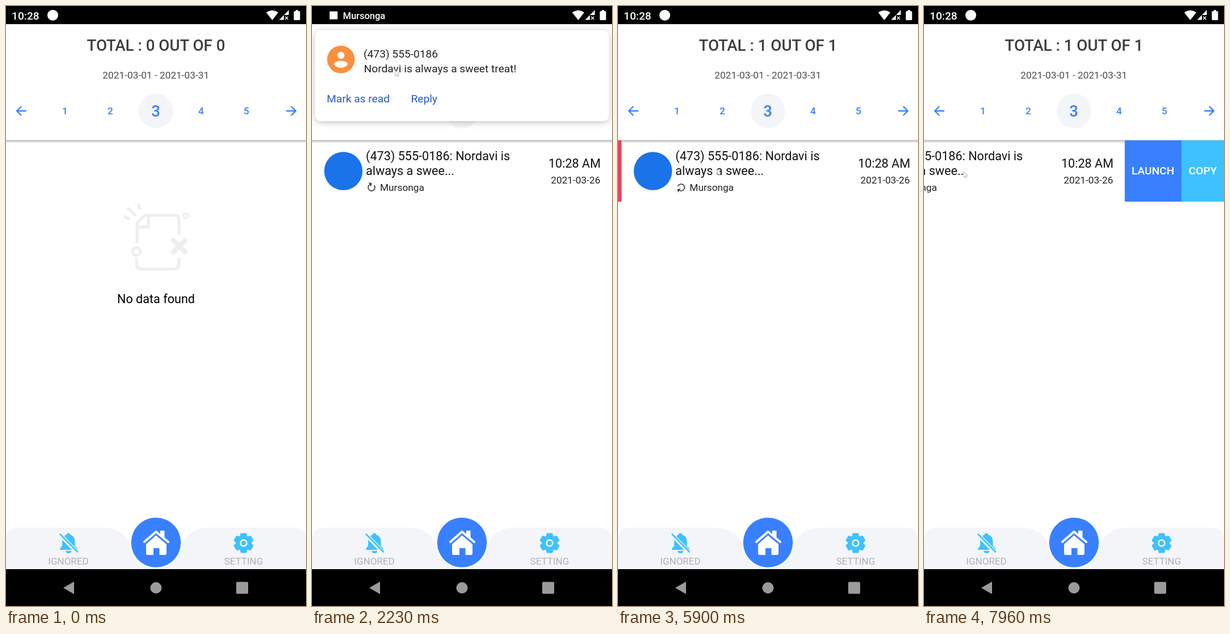
These frames come from a looping animation (529x1058 px, 8000 ms). An HTML page:

```html
<!DOCTYPE html>
<html lang="en">
<head>
<meta charset="utf-8">
<title>Notification list</title>
<style>
  html, body { margin: 0; width: 100%; height: 100%; overflow: hidden; background: #fff; }
  svg { display: block; width: 529px; height: 1058px; font-family: Roboto, sans-serif; }
  .mid { text-anchor: middle; }
  .end { text-anchor: end; }
  .bold { font-weight: 500; }
  .s { font-size: 17.3px; }
  .m { font-size: 21.6px; }
  .l { font-size: 27.7px; }
  .btn { font-size: 19.2px; font-weight: 500; fill: #fff; }
  .note { font-size: 19.2px; fill: #222; }
  .line { fill: none; stroke-linecap: round; stroke-linejoin: round; }
</style>
</head>
<body>
<svg viewBox="0 0 529 1058">
  <defs>
    <linearGradient id="edge" x2="0" y2="1">
      <stop stop-color="#e4e4e4"/><stop offset=".25" stop-color="#c2c2c2"/>
      <stop offset=".5" stop-color="#dadada"/><stop offset="1" stop-color="#fff"/>
    </linearGradient>
    <linearGradient id="busy" x2="0" y2="1">
      <stop stop-color="#dde2ee"/><stop offset=".3" stop-color="#b3c1e2"/>
      <stop offset=".7" stop-color="#c9d8f8"/><stop offset="1" stop-color="#f4f7ff"/>
    </linearGradient>
    <filter id="shadow" x="-20%" y="-20%" width="140%" height="140%">
      <feDropShadow dx="0" dy="2" stdDeviation="6" flood-opacity=".25"/>
    </filter>
    <clipPath id="cardClip"><rect y="43" width="523.5" height="160"/></clipPath>
    <clipPath id="leftClip"><rect id="leftRect" y="237" height="108"/></clipPath>
    <clipPath id="rightClip"><rect id="rightRect" y="237" height="108"/></clipPath>
  </defs>
  <rect width="529" height="1058" fill="#fff"/>

  <!-- header -->
  <rect id="divider" y="236" width="529" height="6"/>
  <text id="total" class="l bold mid" x="264.5" y="79" fill="#3d3d3d"></text>
  <text class="s mid" x="264.3" y="128" fill="#4c4c4c">2021-03-01 - 2021-03-31</text>
  <circle cx="264.5" cy="185" r="30.5" fill="#f4f5f8"/>
  <g id="pages" class="bold mid" fill="#3880ff"></g>
  <path class="line" d="M35 185H19M26.500 177.500L19 185L26.500 192.500M495 185H511M503.500 177.500L511 185L503.500 192.500"
    stroke="#3880ff" stroke-width="2.3"/>

  <!-- empty state -->
  <g id="empty">
    <g class="line" stroke="#eee" stroke-width="5">
      <path d="M231 415V383L245 369H298Q305 369 305 376V401M251 370V390H232M230 447V454Q230 464 240 464H294Q305 464 305 454V446"/>
      <path d="M209.500 372L217 375M215.500 357L227 368M233.500 350L236 357"/>
      <circle cx="230" cy="433" r="7"/>
      <circle cx="316.500" cy="370" r="4" stroke-width="3.2"/>
      <path d="M295 413L316 434M316 413L295 434" stroke-width="8.500"/>
    </g>
    <text class="m mid" x="264.500" y="524">No data found</text>
  </g>

  <!-- list row -->
  <g id="list">
    <g id="row">
      <circle cx="55.300" cy="291" r="33.800" fill="#1a73e8"/>
      <g class="m" fill="#111">
        <text x="95" y="272">(473) 555-0186: Nordavi is</text>
        <text x="95" y="297.500">always a swee...</text>
        <text class="end" x="509" y="285">10:28 AM</text>
      </g>
      <g class="s" fill="#222">
        <text x="120" y="325.700">Mursonga</text>
        <text class="end" x="508.500" y="313">2021-03-26</text>
      </g>
      <g id="spin" class="line" stroke="#222" stroke-width="1.500">
        <path d="M4.800 3.600A6 6 0 1 1 3.600 -4.800L5.500 -3.200M6.200 -6.500V-2.500H2.200"/>
      </g>
    </g>
    <g clip-path="url(#leftClip)">
      <rect y="237" width="186" height="108" fill="#eb445a"/>
      <text class="btn" x="12" y="297">DELETE</text>
      <text class="btn" x="105" y="297">IGNORE</text>
    </g>
    <g clip-path="url(#rightClip)">
      <rect x="354" y="237" width="100" height="108" fill="#3880ff"/>
      <rect x="454" y="237" width="75" height="108" fill="#3dc2ff"/>
      <text class="btn mid" x="403.700" y="297">LAUNCH</text>
      <text class="btn mid" x="491.500" y="297">COPY</text>
    </g>
  </g>

  <!-- tab bar -->
  <path d="M0 993V942Q0 920 22 920H172C196 920 210 932 217 945A47.500 47.500 0 0 0 312 945C319 932 333 920 357 920H507Q529 920 529 942V993Z" fill="#f4f5f8"/>
  <circle cx="264.500" cy="946" r="43.800" fill="#3880ff"/>
  <g fill="#fff">
    <path class="line" d="M244 945L264.500 927L286 945" style="stroke:#fff;stroke-width:4"/>
    <path d="M272 925H279.500V940L272 933ZM247 949L264.500 933.500L283 949V965Q283 968 280 968H270.500V956H260V968H250Q247 968 247 965Z"/>
  </g>
  <g fill="#3dc2ff">
    <path d="M110 929.500C112 929.500 113.500 931 113.500 932.500C119 934 121.500 938.500 121.500 945V952L126 957V959H95V957L99 952V945C99 938.500 101.500 934 106.500 932.500C106.500 931 108 929.500 110 929.500ZM105 961H115.500A5.300 4.500 0 0 1 105 961Z"/>
    <path class="line" d="M96 933L125 963" stroke="#f4f5f8" stroke-width="7"/>
    <path class="line" d="M95.500 931.500L126 962.500" stroke="#3dc2ff" stroke-width="2.600"/>
    <path id="gear" stroke="#3dc2ff" stroke-width="3" stroke-linejoin="round"/>
    <circle cx="419" cy="947" r="5.400" stroke="#f4f5f8" stroke-width="2.600"/>
  </g>
  <g class="mid" font-size="17" fill="#afb0b5">
    <text x="110" y="984.700">IGNORED</text>
    <text x="419" y="984.700">SETTING</text>
  </g>

  <!-- system navigation -->
  <rect y="993" width="529" height="65"/>
  <g fill="#9b9b9b">
    <path d="M101 1026L120 1015V1037Z"/>
    <circle cx="264.500" cy="1026" r="10"/>
    <rect x="406" y="1015.500" width="21" height="21" rx="2"/>
  </g>

  <!-- heads-up card -->
  <g id="card">
    <rect id="sheet" y="43" height="160" rx="10" fill="#fff" filter="url(#shadow)"/>
    <g clip-path="url(#cardClip)">
      <g id="content" class="note">
        <circle cx="51" cy="94.300" r="24.300" fill="#fa903e"/>
        <circle cx="51" cy="87" r="6.200" fill="#fff"/>
        <path d="M39 103C39 94.500 63 94.500 63 103C60 107 56 109 51 109S42 107 39 103Z" fill="#fff"/>
        <text x="91" y="91">(473) 555-0186</text>
        <text x="91.500" y="117.300">Nordavi is always a sweet treat!</text>
        <g fill="#2857c8">
          <text x="26" y="170">Mark as read</text>
          <text x="174.500" y="170">Reply</text>
        </g>
      </g>
    </g>
  </g>

  <!-- status bar -->
  <rect width="529" height="32"/>
  <g fill="#fff">
    <g id="clock">
      <text class="bold" x="10" y="23.800" font-size="19.200">10:28</text>
      <circle cx="82.500" cy="16.300" r="9.500"/>
    </g>
    <g id="ticker">
      <rect x="31" y="9.500" width="14" height="14"/>
      <text class="bold" x="54.500" y="22.800" font-size="16.500">Mursonga</text>
    </g>
    <path d="M459 11.500Q469.500 4 480 11.500L469.500 25Z"/>
    <path d="M498 8V16H490V24.500H481.500Z"/>
    <path class="line" d="M498 8V15M492.500 19L497 23.500M497 19L492.500 23.500" stroke="#fff" stroke-width="1.400"/>
    <path d="M511 7H515V9H517Q518.500 9 518.500 10.500V23.500Q518.500 25 517 25H509Q507.500 25 507.500 23.500V10.500Q507.500 9 509 9H511Z"/>
  </g>

  <path id="cursor" d="M0 0V10L2.300 8L3.800 11.500L5.500 10.800L4.100 7.500H7Z" fill="#fff" stroke="#a4a4a4" stroke-width=".8"/>
</svg>

<script>
const LOOP = 8000, START = 500, STEP = 1000 / 15;
const $ = id => document.getElementById(id);

// Tables of [time, value...]
const drop = [[433, -175], [700, -25], [1033, 0]];
const swipe = [[2300, 0], [2966, 299], [3230, 520]];
const slide = [[5880, 0], [6433, 174], [6560, 186], [6850, 186], [7180, 0], [7420, 0], [7920, -175]];
const pointer = [
  [1500, 215, 400], [2100, 156, 124], [2300, 142, 108], [2966, 441, 105],
  [3200, 505, 112], [3833, 322, 640], [4300, 321, 754], [4800, 321, 754],
  [5560, 172, 368], [5820, 150, 288], [6433, 341, 286], [6560, 352, 286],
  [6850, 352, 286], [7180, 261, 290], [7400, 261, 290], [7920, 70, 292]
];

function at(table, t) {
  if (t <= table[0][0]) return table[0].slice(1);
  const i = table.findIndex(row => row[0] > t);
  if (i < 0) return table[table.length - 1].slice(1);
  const a = table[i - 1], b = table[i];
  const p = (t - a[0]) / (b[0] - a[0]);
  return a.slice(1).map((v, k) => v + (b[k + 1] - v) * p);
}

const set = (id, name, value) => $(id).setAttribute(name, value);
const show = (id, on) => set(id, 'display', on ? 'inline' : 'none');
const move = (id, x, y) => set(id, 'transform', `translate(${x} ${y})`);

function buildPages() {
  for (let n = 1; n <= 5; n++) {
    const text = document.createElementNS('http://www.w3.org/2000/svg', 'text');
    const big = n === 3;
    text.setAttribute('x', 264 + (n - 3) * 80);
    text.setAttribute('y', big ? 194.500 : 190.800);
    text.setAttribute('class', big ? 'l' : 's');
    text.textContent = n;
    $('pages').append(text);
  }
}

function buildGear() {
  const points = [];
  for (let tooth = 0; tooth < 6; tooth++) {
    for (const [deg, r] of [[-23, 12.5], [-14, 16.5], [14, 16.5], [23, 12.5]]) {
      const a = (tooth * 60 + 30 + deg) * Math.PI / 180;
      points.push(`${419 + r * Math.cos(a)} ${947 + r * Math.sin(a)}`);
    }
  }
  set('gear', 'd', `M${points.join('L')}Z`);
}

function render(time) {
  const k = Math.floor((time - START + 10) / STEP);
  const t = k < 0 ? 0 : START + k * STEP;
  const loaded = t >= 1500, loading = t >= 1299 && !loaded;

  show('empty', t < 1299);
  show('list', loaded);
  set('divider', 'fill', loading ? 'url(#busy)' : 'url(#edge)');
  const n = t < 1299 ? 0 : 1;
  $('total').textContent = `TOTAL : ${n} OUT OF ${n}`;

  const ticker = t >= START && t < 3360;
  show('ticker', ticker);
  show('clock', !ticker);

  const [dy] = at(drop, t), [dx] = at(swipe, t);
  show('card', t >= START && dx < 510);
  move('card', 0, dy);
  move('content', dx, 0);
  set('sheet', 'x', 5.5 + dx);
  set('sheet', 'width', Math.max(0, 518 - dx));

  const [off] = at(slide, t);
  move('row', off, 0);
  set('leftRect', 'width', Math.max(0, off));
  set('rightRect', 'x', 529 + Math.min(0, off));
  set('rightRect', 'width', Math.max(0, -off));
  set('spin', 'transform', `translate(105 320) rotate(${(t - 6433) * 0.36})`);

  show('cursor', loaded);
  move('cursor', ...at(pointer, t));
}

buildPages();
buildGear();
const origin = performance.now();
function tick() {
  render((performance.now() - origin) % LOOP);
  requestAnimationFrame(tick);
}
tick();
</script>
</body>
</html>
```
